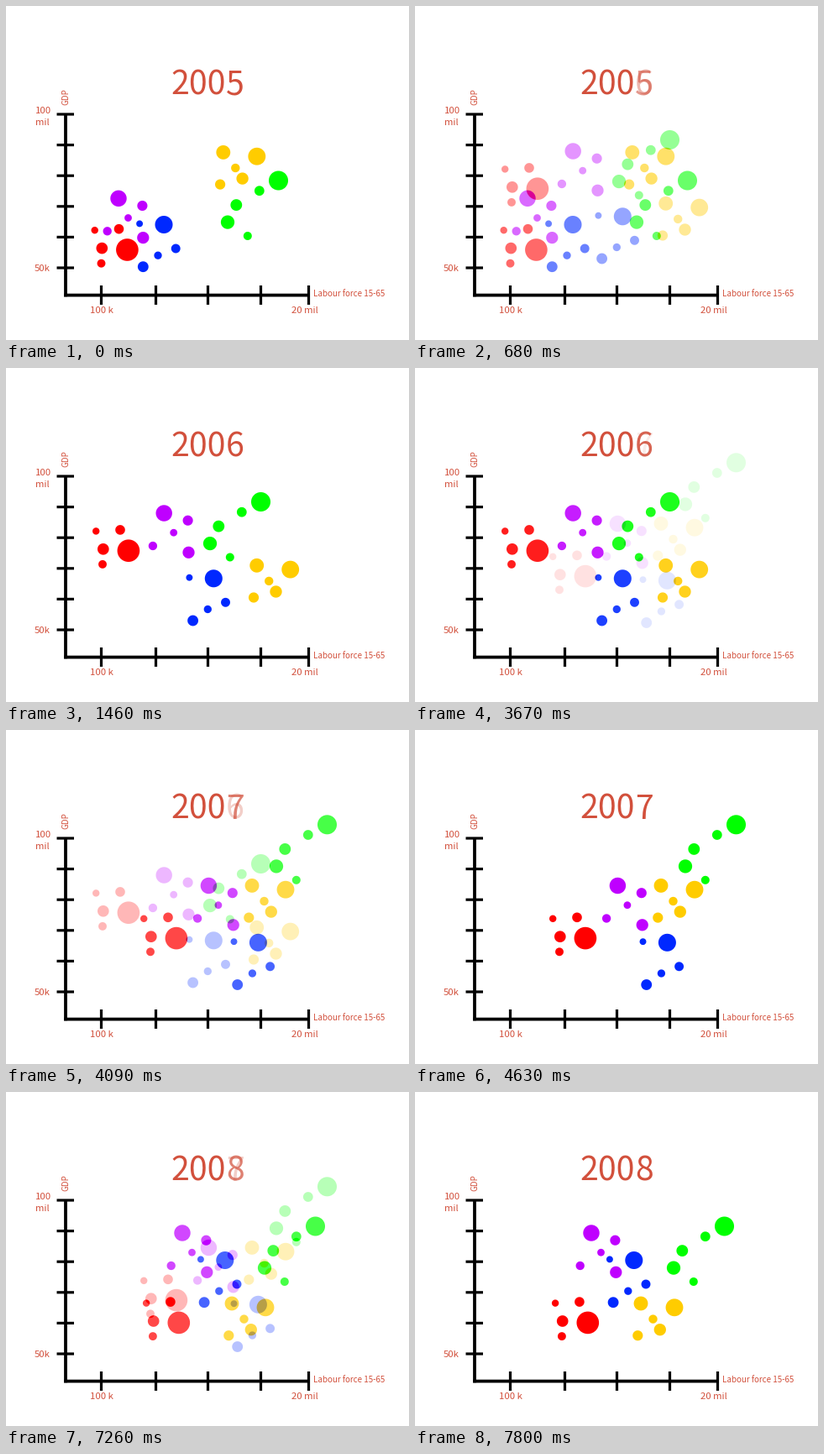
A matplotlib script that plays this animation: 480x398 px, repeating every 8 s.

```python
from colorsys import hsv_to_rgb

import numpy as np
import matplotlib.pyplot as plt
from matplotlib.animation import FuncAnimation

W, H, DPI = 480, 398, 100
LOOP, TICK = 8000, 20
FIRST_HOLD, PERIOD = 500, 3170      # ms before the first fade, and per year
FADE_STEPS, FADE_TICK = 17, 60
SHRINK = 0.85                       # each companion against the one before
FONT, INK = "Noto Sans CJK JP", "#d2503c"

# hue, radius of leader and first companion,
# companions seen from the leader (largest first), leader's place each year
CLUSTERS = [
    (285, 9.7, 7.1, [29.3+46.8j, 28.4+8.7j, -13.3+39j, 11.5+23.2j],
     [134+229.3j, 188.2+173j, 241.4+185.5j, 210+168j]),
    (0, 13.3, 6.8, [-30.1-1.9j, -9.9-24.8j, -30.9+16.2j, -38.7-23.3j],
     [144.4+290.5j, 145.9+217.7j, 202.9+248.1j, 205.8+274.9j]),
    (230.5, 10.5, 6.4, [-24.7+50.2j, 14.2+28.5j, -7+36.7j, -28.9-1.1j],
     [188+260.5j, 247.3+250.8j, 300.4+253.3j, 260.8+200.5j]),
    (48, 10.4, 8.4, [-40-4.8j, -17.2+26.4j, -43.7+33.4j, -25.5+13.8j],
     [298.8+179.2j, 338.7+240.1j, 333+190.2j, 309+256.8j]),
    (120, 11.5, 8.1, [-60.5+49.6j, -50.2+29.1j, -22.7+12.2j, -36.7+66j],
     [324.5+208j, 303.5+159.5j, 382.5+112.8j, 368.5+160j]),
]

pixels = np.arange(W) + 0.5 + 1j * (np.arange(H)[:, None] + 0.5)


def bubbles(year):
    """Antialiased picture of all clusters in one year."""
    img = np.ones((H, W, 3))
    for hue, lead, follow, companions, path in CLUSTERS:
        rgb = np.array(hsv_to_rgb(hue / 360, 1, 1))
        radii = [lead] + [follow * SHRINK**k for k in range(4)]
        for offset, r in zip([0] + companions, radii):
            dist = abs(pixels - path[year] - offset)
            img += (rgb - img) * np.clip(r + 0.5 - dist, 0, 1)[..., None]
    return img


scenes = [bubbles(i) for i in range(4)]

fig = plt.figure(figsize=(W / DPI, H / DPI), dpi=DPI, facecolor="white")
ax = fig.add_axes([0, 0, 1, 1])
ax.axis("off")
picture = ax.imshow(scenes[0], extent=(0, W, H, 0), aspect="auto",
                    interpolation="nearest")
ax.set(xlim=(0, W), ylim=(H, 0))


def line(x0, y0, x1, y1, width=3.2):
    ax.plot([x0, x1], [y0, y1], color="black", lw=width * 72 / DPI,
            solid_capstyle="butt", snap=False)


def label(x, y, s, size=11.3, rotation=0):
    return ax.text(x, y, s, fontsize=size * 72 / DPI, color=INK, family=FONT,
                   va="baseline", rotation=rotation, rotation_mode="anchor")


line(71, 128, 71, 346.3, 3.8)
line(69.1, 344.6, 362, 344.6, 3.8)
for y in np.linspace(129, 312, 6):
    line(60.5, y, 81, y)
for x in (113.5, 178.5, 240.5, 303.5, 360.5):
    line(x, 333, x, 356)

label(34.5, 128, "100")
label(34.5, 142.5, "mil")
label(33.8, 316.5, "50k")
label(100.5, 366.5, "100 k")
label(339.7, 366.5, "20 mil")
label(366.3, 346.3, "Labour force 15-65", 9.8)
label(74.5, 117.8, "GDP", 9.8, rotation=90)

YEAR_X, YEAR_Y, YEAR_SIZE = 196.5, 105.9, 39.2
DIGIT_WIDTH = 0.555 * YEAR_SIZE
label(YEAR_X, YEAR_Y, "200", YEAR_SIZE)
digits = [label(YEAR_X + 3 * DIGIT_WIDTH, YEAR_Y, str(5 + i), YEAR_SIZE)
          for i in range(4)]


def draw(k):
    turn, since = divmod(k * TICK + TICK / 2 - FIRST_HOLD, PERIOD)
    year = int(turn) + 1
    before = max(year - 1, 0)
    step = min(since // FADE_TICK + 1, FADE_STEPS)
    mix = 1 - (1 - step / FADE_STEPS) ** 2      # quadratic ease-out
    picture.set_data(scenes[before] * (1 - mix) + scenes[year] * mix)
    for i, digit in enumerate(digits):
        digit.set_alpha(mix if i == year else 1 - mix if i == before else 0)
    return [picture, *digits]


anim = FuncAnimation(fig, draw, frames=LOOP // TICK, interval=TICK,
                     init_func=lambda: draw(0), repeat=True, repeat_delay=0)
plt.show()
```
